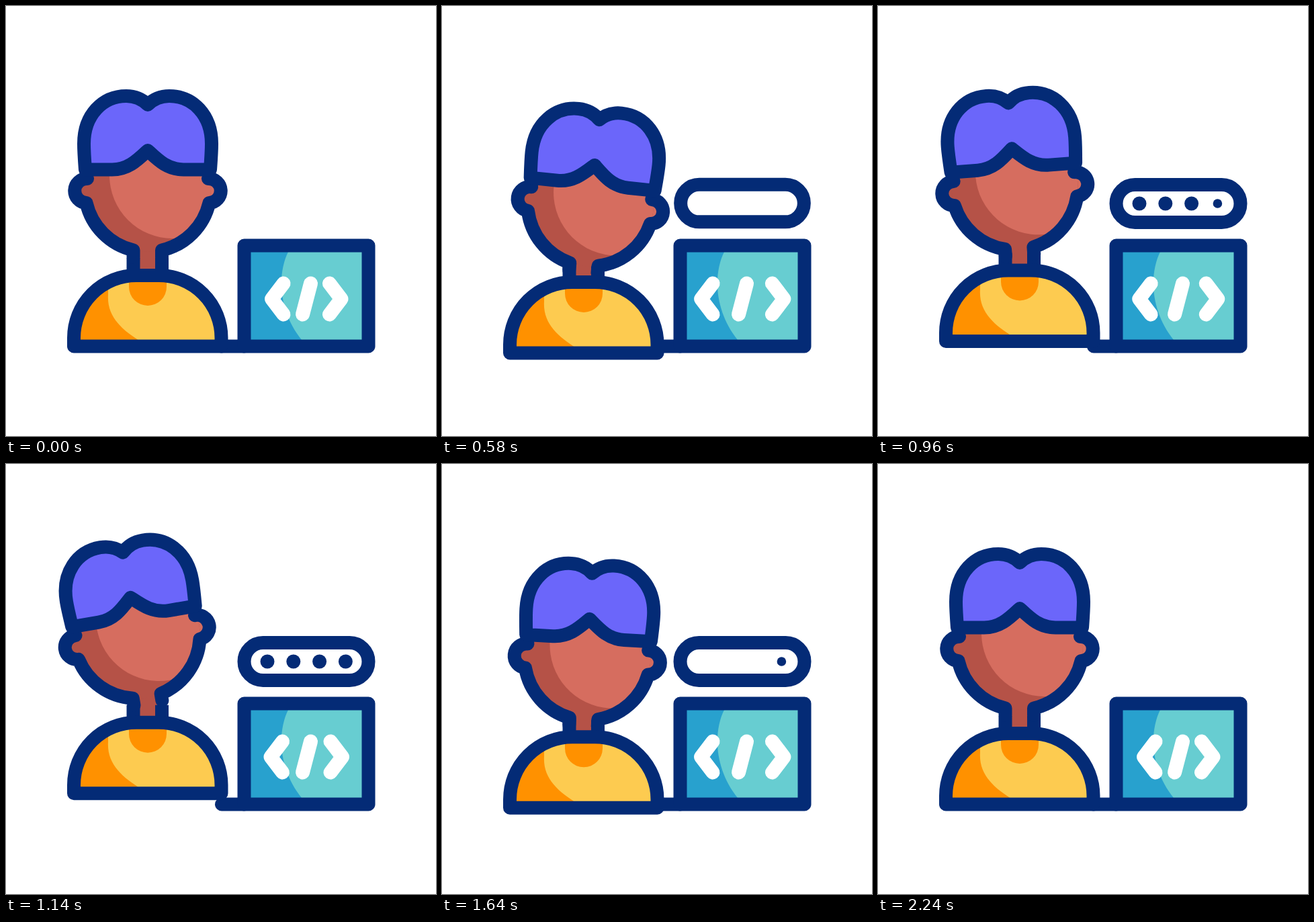
Recreate the animation shown at these times as an HTML page. Size 640 by 640 pixels, loop 2.4 s.

```html
<!DOCTYPE html>
<html lang="en">
<head>
<meta charset="utf-8">
<title>Developer at a laptop</title>
<style>
  html, body { margin: 0; height: 100%; overflow: hidden; background: #fff; }
  svg { display: block; width: 100vw; height: 100vh; }
  .line { stroke: #042b76; stroke-width: 20; stroke-linecap: round; stroke-linejoin: round; }
  .code { fill: none; stroke: #fff; stroke-width: 21; stroke-linecap: round; stroke-linejoin: round; }
</style>
</head>
<body>
<svg viewBox="0 0 640 640">
  <defs>
    <clipPath id="faceClip"><circle cx="211" cy="272" r="94"/></clipPath>
    <path id="torso" d="M101 506.500V494A93 93 0 0 1 194 401H227.500A93 93 0 0 1 320.500 494V506.500Z"/>
    <clipPath id="torsoClip"><use href="#torso"/></clipPath>
  </defs>

  <path class="line" d="M321 506.500H354"/>
  <rect x="354.500" y="356.500" width="185" height="150" fill="#28a1ce"/>
  <path fill="#67cdd1" d="M420 366C403 400 406 455 440 497H535V366Z"/>
  <rect class="line" x="354.500" y="356.500" width="185" height="150" fill="none"/>
  <path class="code" id="open" d="M413 413L395.500 436L413 459"/>
  <path class="code" d="M453.500 413L441.500 459"/>
  <path class="code" id="close" d="M481.500 413L499 436L481.500 459"/>

  <rect class="line" id="pill" fill="#fff"/>
  <g id="dots" fill="#042b76"></g>

  <g id="neck">
    <path fill="#b55247" d="M189 350H232V402H189Z"/>
    <path class="line" style="stroke-linecap:butt" fill="none" d="M189.500 375V401M232 375V401"/>
  </g>

  <g id="head">
    <circle cx="121" cy="275" r="18" fill="#b55247"/>
    <circle cx="301" cy="275" r="18" fill="#d66d5f"/>
    <circle cx="211" cy="272" r="94" fill="#b55247"/>
    <circle cx="248" cy="252" r="94" fill="#d66d5f" clip-path="url(#faceClip)"/>
    <g class="line" fill="none">
      <path d="M121 257A18 18 0 0 0 119.500 293A94 94 0 0 0 189.500 363.500V374"/>
      <path d="M301 257A18 18 0 0 1 302.500 293A94 94 0 0 1 232 363.500V374"/>
    </g>
    <path class="line" fill="#6b66fa" d="M118 243.500C117 230 116 217 116 205C116 162 144 134 179 134
      C192 134 203 139 211 147C219 139 230 134 243 134C278 134 306 162 306 205
      C306 217 305 230 304 243.500H264C240 243.500 226 229 211 215C196 229 182 243.500 158 243.500Z"/>
  </g>

  <g id="body">
    <use href="#torso" fill="#ff9100"/>
    <path fill="#fdcb50" clip-path="url(#torsoClip)" d="M152 400V430C150 462 172 482 203 501V508H322V400Z"/>
    <path fill="#ff9100" d="M183 405V418A28 28 0 0 0 239 418V405Z"/>
    <use href="#torso" class="line" fill="none"/>
  </g>
</svg>
<script>
const LOOP = 2400, STEP = 20;
const el = id => document.getElementById(id);
const set = (node, attrs) => {
  for (const k in attrs) node.setAttribute(k, attrs[k]);
};

const ease = (t, a, b) => {
  const u = Math.min(1, Math.max(0, (t - a) / (b - a)));
  return u * u * (3 - 2 * u);
};

// Eased value through [time, value] keys
const track = (t, keys) => keys.slice(1).reduce(
  (v, [time, value], i) => v + (value - keys[i][1]) * ease(t, keys[i][0], time), keys[0][1]);

const sway = (t, low, high) =>
  track(t, [[200, 0], [600, high], [1200, low], [1800, high], [2200, 0]]);

const dots = [0, 1, 2, 3].map(i => {
  const dot = document.createElementNS("http://www.w3.org/2000/svg", "circle");
  set(dot, { cx: 389 + 38.8 * i, cy: 294 });
  return el("dots").appendChild(dot);
});

function draw(t) {
  const bodyY = sway(t, -17, 10);
  const angle = sway(t, -10, 6);
  // The head lags slightly behind between its two extremes
  const p = t > 600 && t < 1800 ? (angle + 10) / 16 : 1;
  const headY = sway(t, -19.8, 21.2) + 9.6 * p * (1 - p);
  for (const id of ["neck", "body"]) set(el(id), { transform: `translate(0 ${bodyY})` });
  set(el("head"), { transform: `translate(0 ${headY}) rotate(${angle} 211 370)` });

  const spread = track(t, [[200, 0], [600, 10], [800, 10], [1200, 1], [1600, 10], [1800, 10], [2200, 0]]);
  set(el("open"), { transform: `translate(${-spread} 0)` });
  set(el("close"), { transform: `translate(${spread} 0)` });

  const s = track(t, [[200, 0], [600, 1], [1800, 1], [2200, 0]]);
  const w = 185 * s, h = 56 * s;
  set(el("pill"), {
    x: 447 - w / 2, y: 234 + 60 * s - h / 2, width: w, height: h, rx: h / 2,
    visibility: s > 0.001 ? "visible" : "hidden"
  });

  dots.forEach((dot, i) => {
    const on = 600 + 100 * i, off = 1300 + 100 * i;
    set(dot, { r: 10.5 * (ease(t, on, on + 100) - ease(t, off, off + 100)) });
  });
}

const start = performance.now();
function tick() {
  const t = (performance.now() - start) % LOOP;
  draw(Math.floor(t / STEP) * STEP);
  requestAnimationFrame(tick);
}
tick();
</script>
</body>
</html>
```
